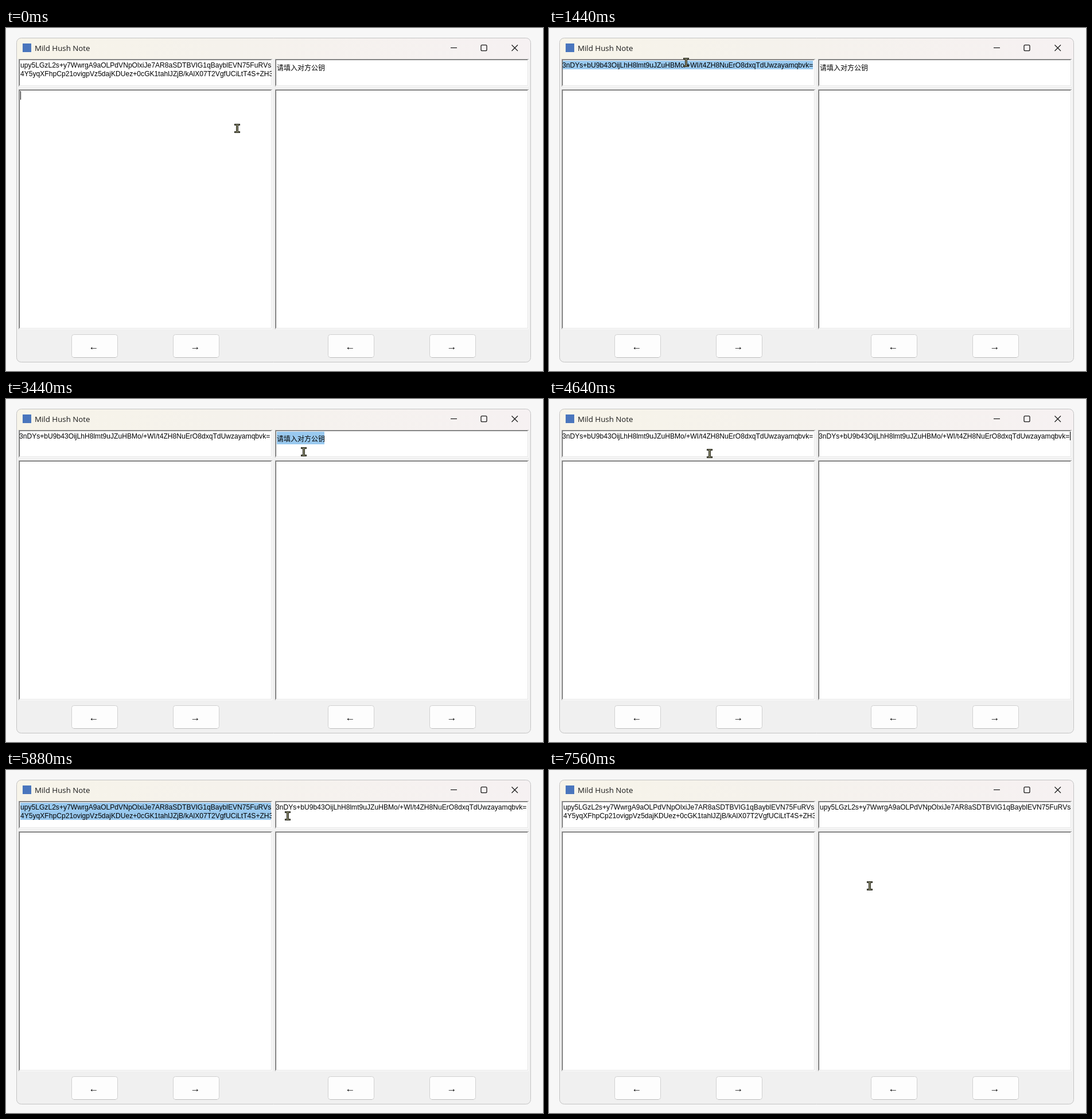
Recreate the animation shown at these times as an HTML page with a canvas. Size 936 px wide and 598 px high, loop 8 s.

```html
<!DOCTYPE html>
<html lang="zh">
<head>
<meta charset="utf-8">
<title>Mild Hush Note</title>
<style>
html, body { margin: 0; width: 100%; height: 100%; overflow: hidden; background: #f7f7f7; }
canvas { display: block; }
</style>
</head>
<body>
<canvas id="stage" width="936" height="598"></canvas>
<script>
const ctx = document.getElementById('stage').getContext('2d');
const LOOP = 8000;
const KEY_FONT = '12.1px "Liberation Sans", Arial, sans-serif';
const KEY_START = [
  'upy5LGzL2s+y7WwrgA9aOLPdVNpOlxiJe7AR8aSDTBVIG1qBayblEVN75FuRVs',
  '4Y5yqXFhpCp21ovigpVz5dajKDUez+0cGK1tahlJZjB/kAlX07T2VgfUCiLtT4S+ZH3'
];
const KEY_END = '3nDYs+bU9b43OijLhH8lmt9uJZuHBMo/+WI/t4ZH8NuErO8dxqTdUwzayamqbvk=';
const HINT = '请填入对方公钥';
const SELECT = '#99c9ef';

// Pointer stops: time, x, y
const PATH = [
  [280, 403, 175], [920, 239, 60],
  [2480, 239, 60], [2760, 541, 114], [2920, 519, 92],
  [4200, 519, 92], [4640, 280, 95], [4720, 308, 98],
  [5200, 308, 98], [5560, 563, 138], [5880, 491, 80],
  [6400, 491, 80], [6640, 559, 202]
];
const CLICKS = [1200, 1400, 3200, 3400, 4800, 4880, 6040, 6200, 7000];

const within = (t, a, b) => t >= a && t < b;

function pointerAt(t) {
  if (t <= PATH[0][0]) return PATH[0].slice(1);
  for (let i = 1; i < PATH.length; i++) {
    const [t0, x0, y0] = PATH[i - 1], [t1, x1, y1] = PATH[i];
    if (t < t1) {
      const u = (t - t0) / (t1 - t0), e = u * u * (3 - 2 * u);
      return [Math.round(x0 + (x1 - x0) * e), Math.round(y0 + (y1 - y0) * e)];
    }
  }
  return PATH[PATH.length - 1].slice(1);
}

function rect(x, y, w, h, color) {
  ctx.fillStyle = color;
  ctx.fillRect(x, y, w, h);
}

function rounded(x, y, w, h, r, fill, stroke, width = 1) {
  ctx.beginPath();
  ctx.roundRect(x, y, w, h, r);
  if (fill) { ctx.fillStyle = fill; ctx.fill(); }
  if (stroke) { ctx.strokeStyle = stroke; ctx.lineWidth = width; ctx.stroke(); }
}

function line(x0, y0, x1, y1) {
  ctx.beginPath();
  ctx.moveTo(x0, y0);
  ctx.lineTo(x1, y1);
  ctx.stroke();
}

function text(str, x, y, font, color = '#000') {
  ctx.font = font;
  ctx.fillStyle = color;
  ctx.fillText(str, x, y);
}

function sunken(x, y, w, h) {
  rect(x, y, w, h, '#fff');
  rect(x, y, w, 1, '#a0a0a0');
  rect(x, y, 1, h, '#a0a0a0');
  rect(x + 1, y + 1, w - 2, 1, '#696969');
  rect(x + 1, y + 1, 1, h - 2, '#696969');
  rect(x + 1, y + h - 2, w - 2, 1, '#e3e3e3');
  rect(x + w - 2, y + 1, 1, h - 2, '#e3e3e3');
}

function button(x, arrow) {
  rounded(x + .5, 534.5, 80, 40, 4, '#fdfdfd', '#d0d0d0');
  rect(x + 4, 574, 73, 1, '#bcbcbc');
  ctx.textAlign = 'center';
  text(arrow, x + 39, 561, '17px "Liberation Sans", Arial, sans-serif');
  ctx.textAlign = 'left';
}

function drawWindow() {
  rect(0, 0, 936, 598, '#f7f7f7');
  rounded(18.5, 17.5, 896, 565, 8, '#f0f0f0');
  ctx.save();
  ctx.clip();
  const bar = ctx.createLinearGradient(18, 0, 915, 0);
  bar.addColorStop(0, '#f7f4e9');
  bar.addColorStop(.4, '#f5f2ec');
  bar.addColorStop(1, '#f6f1f2');
  rect(18, 17, 897, 37, bar);
  ctx.restore();
  rounded(18.5, 17.5, 896, 565, 8, null, '#c3c3c3');

  rect(29, 27, 15, 15, '#4a76bd');
  text('Mild Hush Note', 50, 40, '13.3px "Open Sans", sans-serif', '#1a1a1a');
  ctx.strokeStyle = '#1a1a1a';
  ctx.lineWidth = 1.2;
  line(775, 34.5, 786, 34.5);
  line(881.5, 29.5, 892, 40);
  line(892, 29.5, 881.5, 40);
  rounded(828, 29.7, 10, 10, 2, null, '#1a1a1a', 1.3);

  for (const shift of [0, 447]) {
    sunken(22 + shift, 54, 442, 48);
    sunken(22 + shift, 107, 442, 418);
    button(114 + shift, '←');
    button(291 + shift, '→');
  }
}

function keyLines(lines, x, selected, edge) {
  lines.forEach((str, i) => {
    ctx.font = KEY_FONT;
    if (selected) rect(x, 57 + i * 15, Math.min(ctx.measureText(str).width, edge - x), 15, SELECT);
    text(str, x, 69 + i * 15, KEY_FONT);
  });
}

function clipped(x, draw) {
  ctx.save();
  ctx.beginPath();
  ctx.rect(x, 56, 439, 44);
  ctx.clip();
  draw();
  ctx.restore();
}

function drawLeftKey(t) {
  const atEnd = within(t, 1440, 4920);
  const selected = within(t, 1440, 3200) || within(t, 4920, 6040);
  if (atEnd) keyLines([KEY_END], 23, selected, 462);
  else keyLines(KEY_START, 25, selected, 462);
}

function drawRightKey(t) {
  if (t < 4240) {
    if (t >= 3440) rect(472, 57, 83, 22, SELECT);
    text(HINT, 472, 74, '12px "Noto Sans CJK SC", "Noto Sans CJK", sans-serif');
  } else if (t < 6240) {
    keyLines([KEY_END], 470, false, 910);
  } else {
    keyLines([KEY_START[0]], 472, t < 7000, 910);
  }
}

function drawCarets(t) {
  if (t < 1200) rect(25, 110, 1, 15, '#000');
  if (within(t, 4240, 4800)) rect(908, 57, 1, 15, '#000');
  if (within(t, 7080, 7560)) rect(472, 110, 1, 15, '#000');
}

function drawPointer(t) {
  const [x, y] = pointerAt(t);
  if (CLICKS.some(c => within(t, c, c + 40))) {
    ctx.beginPath();
    ctx.arc(x, y, 13, 0, Math.PI * 2);
    ctx.fillStyle = 'rgba(255,255,0,.47)';
    ctx.fill();
  }
  const dark = '#25251c', core = '#85856a';
  rect(x - 5, y - 8, 10, 3, dark);
  rect(x - 5, y + 5, 10, 3, dark);
  rect(x - 2, y - 6, 4, 12, dark);
  rect(x - 4, y - 7, 8, 1, core);
  rect(x - 4, y + 6, 8, 1, core);
  rect(x - 1, y - 6, 2, 12, core);
}

function frame(now) {
  const t = Math.floor((now % LOOP) / 40) * 40;
  ctx.fontKerning = 'none';
  drawWindow();
  clipped(24, () => drawLeftKey(t));
  clipped(471, () => drawRightKey(t));
  drawCarets(t);
  drawPointer(t);
  requestAnimationFrame(frame);
}
requestAnimationFrame(frame);
</script>
</body>
</html>
```
